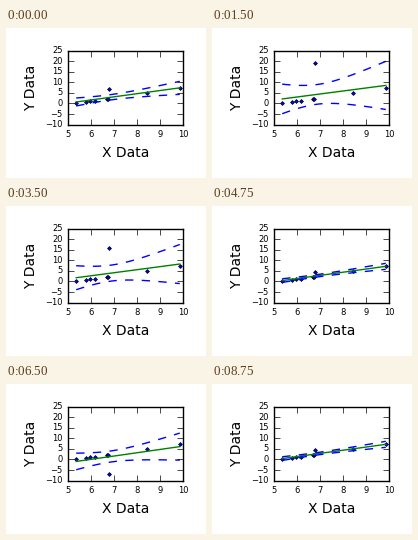
Write a matplotlib script that moves like this. It is 200 px wide and 150 px high and loops after 9 s.

```python
import numpy as np
import matplotlib.pyplot as plt
from matplotlib.animation import FuncAnimation

plt.style.use("classic")
plt.rcParams["font.family"] = "DejaVu Sans"

W, H, DPI = 200, 150, 100
FRAMES, INTERVAL = 36, 250
T_95 = 2.3646  # two-sided 95 % Student t, 7 degrees of freedom
MOVING = 6

x = np.array([5.357, 5.797, 5.936, 6.161, 6.697, 6.731, 6.775, 8.442, 9.861])
y0 = np.array([0.376, 0.874, 1.049, 1.327, 2.054, 2.077, 2.138, 4.744, 7.104])
xs = np.linspace(x.min(), x.max(), 100)


def data_at(i):
    """Data with one point swinging up and down as a sine."""
    y = y0.copy()
    y[MOVING] = 6.775 + 14 * np.sin(2 * np.pi * i / FRAMES)
    return y


def fit(y):
    """Straight-line fit and half width of its confidence band."""
    slope, offset = np.polyfit(x, y, 1)
    rest = y - (slope * x + offset)
    s = np.sqrt(np.sum(rest**2) / (len(x) - 2))
    dx = x - x.mean()
    half = T_95 * s * np.sqrt(1 / len(x) + (xs - x.mean()) ** 2 / np.sum(dx**2))
    return slope * xs + offset, half


fig = plt.figure(figsize=(W / DPI, H / DPI), dpi=DPI, facecolor="white")
left, right, bottom, top = 62, 177, 53.4, 127.4
ax = fig.add_axes([left / W, bottom / H, (right - left) / W, (top - bottom) / H])
ax.set_xlim(5, 10)
ax.set_ylim(-10, 25)
ax.set_xticks(range(5, 11))
ax.set_yticks(range(-10, 26, 5))
ax.tick_params(labelsize=6)
ax.set_xlabel("X Data", fontsize=10)
ax.set_ylabel("Y Data", fontsize=10)

points, = ax.plot([], [], "bD", markersize=2)
line, = ax.plot([], [], "g-")
lower, = ax.plot([], [], "b--")
upper, = ax.plot([], [], "b--")


def draw(i):
    y = data_at(i)
    mid, half = fit(y)
    points.set_data(x, y)
    line.set_data(xs, mid)
    lower.set_data(xs, mid - half)
    upper.set_data(xs, mid + half)
    return points, line, lower, upper


anim = FuncAnimation(fig, draw, frames=FRAMES, interval=INTERVAL,
                     repeat=True, repeat_delay=0)
plt.show()
```
